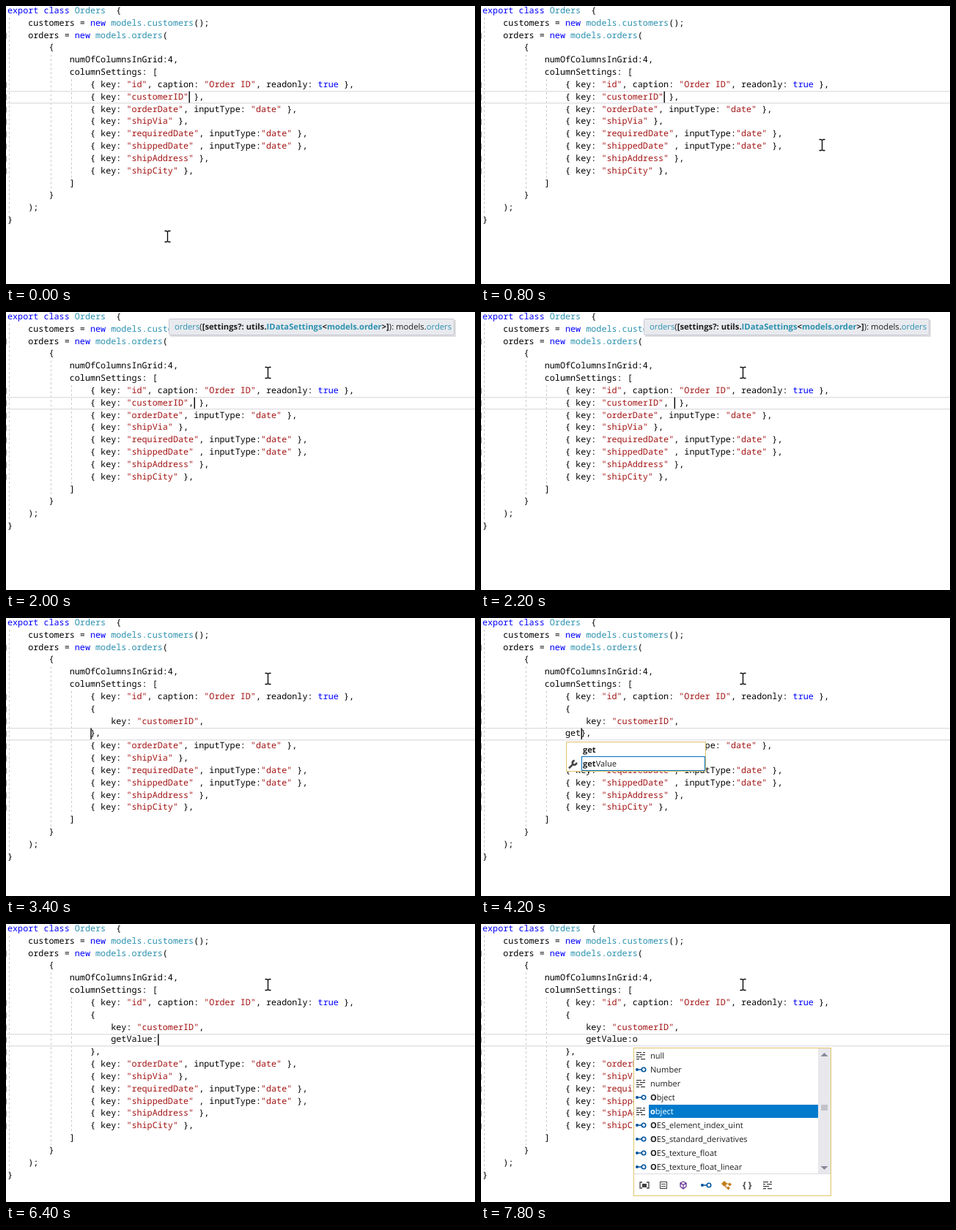
Animation of 640 by 380 pixels, one loop 8 s. Source, as an HTML page with a canvas:

```html
<!DOCTYPE html>
<html lang="en">
<head>
<meta charset="utf-8">
<title>Code editor</title>
<style>
  html, body { margin: 0; width: 640px; height: 380px; overflow: hidden; background: #fff; }
  canvas { display: block; }
</style>
</head>
<body>
<canvas id="stage" width="640" height="380"></canvas>
<script>
const ctx = document.getElementById('stage').getContext('2d');
const LOOP = 8000, CHAR = 7.06, LINE = 16.83;
const BLUE = '#0000ff', TEAL = '#2b91af', RED = '#a31515', ICON = '#424242', LINK = '#00539c';
const colX = col => 2 + col * CHAR;
const baseline = line => 10 + line * LINE;

const head = [
  'export class Orders  {',
  '    customers = new models.customers();',
  '    orders = new models.orders(',
  '        {',
  '            numOfColumnsInGrid:4,',
  '            columnSettings: ['
];
const firstRow = '{ key: "id", caption: "Order ID", readonly: true },';
const lastRows = [
  '{ key: "orderDate", inputType: "date" },',
  '{ key: "shipVia" },',
  '{ key: "requiredDate", inputType:"date" },',
  '{ key: "shippedDate" , inputType:"date" },',
  '{ key: "shipAddress" },',
  '{ key: "shipCity" },'
];
const tail = ['            ]', '        }', '    );', '}'];

// Edited rows over time; "|" marks the visible caret.
const split = (...rows) => ['{', '    key: "customerID",', ...rows];
const steps = [
  [0, ['{ key: "customerID"| },']],
  [1800, ['{ key: "customerID",| },']],
  [2000, ['{ key: "customerID",| },'], drawTip],
  [2200, ['{ key: "customerID", | },'], drawTip],
  [2400, split('|},')],
  [3000, split('},')],
  [3400, split('|},')],
  [4000, split('g|},'), () => drawMembers('g', ['caption', 'click', 'cssClass', 'designMode',
    'displayValue', 'get', 'getValue', 'inputType', 'key', 'readonly'], 6)],
  [4200, split('get|},'), () => drawMembers('get', ['get', 'getValue'], 1)],
  [4400, split('getV|},'), () => drawMembers('getV', ['getValue'], 0)],
  [4600, split('getVal|},'), () => drawMembers('getVal', ['getValue'], 0)],
  [4800, split('getValue|},'), () => drawMembers('getValue', ['getValue'], 0)],
  [5000, split('getValue|},')],
  [5400, split('getValue|', '},')],
  [5600, split('    getValue|', '},')],
  [5800, split('    getValue', '},')],
  [6200, split('    getValue|', '},')],
  [6400, split('    getValue:|', '},')],
  [6600, split('    getValue:', '},')],
  [6800, split('    getValue:|', '},')],
  [7200, split('    getValue:', '},')],
  [7600, split('    getValue:o', '},')],
  [7800, split('    getValue:o', '},'), drawTypes]
];

const pointer = [
  [0, 220, 315], [600, 300, 270], [800, 465, 190], [1000, 380, 140],
  [1200, 293, 120], [1400, 325, 100], [1600, 357, 83]
];

const current = (list, t) => list.findLast(item => item[0] <= t);

function box(x, y, w, h, fill) {
  ctx.fillStyle = fill;
  ctx.fillRect(x, y, w, h);
}

function frame(x, y, w, h, color) {
  ctx.strokeStyle = color;
  ctx.lineWidth = 1;
  ctx.strokeRect(x + .5, y + .5, w - 1, h - 1);
}

function path(color, width, ...lines) {
  ctx.strokeStyle = color;
  ctx.lineWidth = width;
  ctx.beginPath();
  for (const [x, y, ...rest] of lines) {
    ctx.moveTo(x, y);
    for (let i = 0; i < rest.length; i += 2) ctx.lineTo(rest[i], rest[i + 1]);
  }
  ctx.stroke();
}

function shape(color, ...points) {
  ctx.fillStyle = color;
  ctx.beginPath();
  for (let i = 0; i < points.length; i += 2) ctx.lineTo(points[i], points[i + 1]);
  ctx.fill();
}

// Flowing interface text made of [text, color, bold] runs.
function runs(x, y, size, ...parts) {
  for (const [text, color, bold] of parts) {
    ctx.font = `${bold ? 'bold ' : ''}${size}px "Open Sans", sans-serif`;
    ctx.fillStyle = color;
    ctx.fillText(text, x, y);
    x += ctx.measureText(text).width;
  }
}

function tokenColor(token) {
  if (token[0] === '"') return RED;
  if (/^(export|class|new|true)$/.test(token)) return BLUE;
  return /^(Orders$|models\.)/.test(token) ? TEAL : '#000';
}

function drawCode(lines) {
  ctx.font = '11.77px "Noto Sans Mono", "DejaVu Sans Mono", monospace';
  lines.forEach((text, line) => {
    const caret = text.indexOf('|');
    for (const m of text.replace('|', '').matchAll(/"[^"]*"|models\.\w+|\w+|[^\w\s"]+/g)) {
      ctx.fillStyle = tokenColor(m[0]);
      ctx.fillText(m[0], colX(m.index), baseline(line));
    }
    if (caret >= 0) box(colX(caret) + .4, baseline(line) - 11, 1.4, 15.4, '#000');
  });
}

function drawGuides(count, active) {
  ctx.setLineDash([3, 3]);
  for (const [col, from, below] of [[0, 1, 1], [8, 4, 3], [12, 6, 4]]) {
    const x = Math.floor(colX(col) + 2.6) + .5;
    path('#c9c9c9', 1, [x, baseline(from) - 11, x, baseline(count - below) - 11]);
  }
  ctx.setLineDash([]);
  for (let line = 2; line < count - 4; line++) {
    if (line === 2 || line > 5) box(0, baseline(line) - 7, 1, 8, '#999');
  }
  for (const dy of [-11.8, 4.2]) box(0, Math.round(baseline(active) + dy), 640, 1.4, '#e0e0e5');
}

function drawTip() {
  box(224, 11, 390, 23, 'rgba(0,0,0,.12)');
  ctx.beginPath();
  ctx.roundRect(222.5, 9.5, 389, 22, 2);
  ctx.fillStyle = '#e9eaee';
  ctx.fill();
  ctx.strokeStyle = '#c6c8d2';
  ctx.lineWidth = 1;
  ctx.stroke();
  runs(230, 24, 11.25, ['orders', TEAL], ['(', '#1e1e1e'],
    ['[settings?: utils.', '#1e1e1e', true], ['IDataSettings', TEAL, true],
    ['<', '#1e1e1e', true], ['models.order', TEAL, true], ['>]', '#1e1e1e', true],
    ['): models.', '#1e1e1e'], ['orders', TEAL]);
}

function wrench(x, y) {
  path(ICON, 2.6, [x - 5, y + 5, x + 1, y - 1]);
  ctx.lineWidth = 2.6;
  ctx.beginPath();
  ctx.arc(x + 2.5, y - 2.5, 2.8, -.1, 4.8);
  ctx.stroke();
}

function drawMembers(typed, names, selected) {
  const x = 116, y = 169, pitch = 19.4, height = Math.round(names.length * pitch + 2);
  box(x, y, 191, height, '#fff');
  frame(x, y, 191, height, '#e0c46a');
  names.forEach((name, i) => {
    const top = y + 1 + i * pitch;
    const match = name.startsWith(typed) ? typed.length : 0;
    if (i === selected) frame(x + 21, Math.round(top), 169, 20, '#0070c0');
    if (name !== 'get') wrench(x + 9, top + 11);
    runs(139, top + 14, 11.1, [name.slice(0, match), '#1e1e1e', true], [name.slice(match), '#1e1e1e']);
  });
}

function keywordIcon(x, y) {
  for (const [dx, dy, w] of [[-6, -5, 7], [3, -5, 3], [-6, -2, 3], [-1, -2, 7],
    [-6, 1, 8], [-6, 4, 4], [0, 4, 6]]) box(x + dx, y + dy, w, 1.3, ICON);
}

function linkIcon(x, y) {
  box(x - 3, y - .7, 5, 1.5, LINK);
  ctx.fillStyle = ctx.strokeStyle = LINK;
  ctx.lineWidth = 1.6;
  ctx.beginPath();
  ctx.arc(x - 5, y, 2.1, 0, 7);
  ctx.fill();
  ctx.beginPath();
  ctx.arc(x + 4, y, 2.7, 0, 7);
  ctx.stroke();
}

function drawFilters(y) {
  path(ICON, 1.3, [220, y - 4, 217, y - 4, 217, y + 4, 220, y + 4],
    [226, y - 4, 229, y - 4, 229, y + 4, 226, y + 4]);
  box(220, y - 2, 6, 5, ICON);
  frame(244, y - 5, 10, 10, ICON);
  path(ICON, 1, [246, y - 1.5, 252, y - 1.5], [246, y + 1.5, 252, y + 1.5]);
  path('#652d90', 1.2, [276, y - 5, 280, y - 3, 280, y + 2, 276, y + 5, 272, y + 2, 272, y - 3, 276, y - 5],
    [272, y - 3, 276, y - .5, 280, y - 3], [276, y - .5, 276, y + 5]);
  linkIcon(307, y);
  shape('#c27d1a', 328, y - 2, 332, y - 6, 336, y - 2, 332, y + 2);
  path('#c27d1a', 1.2, [334, y - 2, 338, y - 2], [334, y, 334, y + 3, 337, y + 3]);
  shape('#c27d1a', 337, y - 1, 339.5, y - 3.5, 342, y - 1, 339.5, y + 1.5);
  shape('#c27d1a', 335, y + 4, 337.5, y + 1.5, 340, y + 4, 337.5, y + 6.5);
  runs(357, y + 4, 12, ['{ }', ICON, true]);
  keywordIcon(391, y);
}

function drawTypes() {
  box(208, 169, 270, 203, '#fff');
  box(460, 170, 17, 171, '#e8e8ec');
  shape('#868999', 463.5, 181, 468.5, 176, 473.5, 181);
  shape('#868999', 463.5, 331, 468.5, 336, 473.5, 331);
  box(464, 247, 9, 8, '#c2c3c9');
  const names = ['null', 'Number', 'number', 'Object', 'object', 'OES_element_index_uint',
    'OES_standard_derivatives', 'OES_texture_float', 'OES_texture_float_linear'];
  names.forEach((name, i) => {
    const y = 180 + i * 19, match = /^o/i.test(name) ? 1 : 0;
    const color = name === 'object' ? '#fff' : '#1e1e1e';
    if (name === 'object') box(229, y - 9, 231, 18, '#007acc');
    (/^[a-z]/.test(name) ? keywordIcon : linkIcon)(218, y);
    runs(231, y + 4, 11.05, [name.slice(0, match), color, true], [name.slice(match), color]);
  });
  box(209, 341, 268, 1, '#dcdde3');
  drawFilters(357);
  frame(208, 169, 270, 203, '#e0c46a');
}

function drawPointer(x, y) {
  const beam = [
    [x - 3.5, y - 7.5, x - 1, y - 7.5, x + .5, y - 6.5, x + 2, y - 7.5, x + 4.5, y - 7.5],
    [x + .5, y - 6.5, x + .5, y + 6.5],
    [x - 3.5, y + 7.5, x - 1, y + 7.5, x + .5, y + 6.5, x + 2, y + 7.5, x + 4.5, y + 7.5]
  ];
  path('#000', 1.3, ...beam);
}

function draw(now) {
  const t = now % LOOP;
  const [, edited, popup] = current(steps, t);
  const [, x, y] = current(pointer, t);
  const rows = [firstRow, ...edited, ...lastRows].map(row => ' '.repeat(16) + row);
  // The lower brace stays on the caret's row until the block is reformatted.
  const lines = [...head, ...rows, ...tail];
  ctx.textRendering = 'geometricPrecision';
  box(0, 0, 640, 380, '#fff');
  drawGuides(lines.length, t < 2400 ? 7 : 9);
  drawCode(lines);
  if (popup) popup();
  drawPointer(x, y);
  requestAnimationFrame(() => draw(performance.now() - start));
}

const start = performance.now();
draw(0);
</script>
</body>
</html>
```
